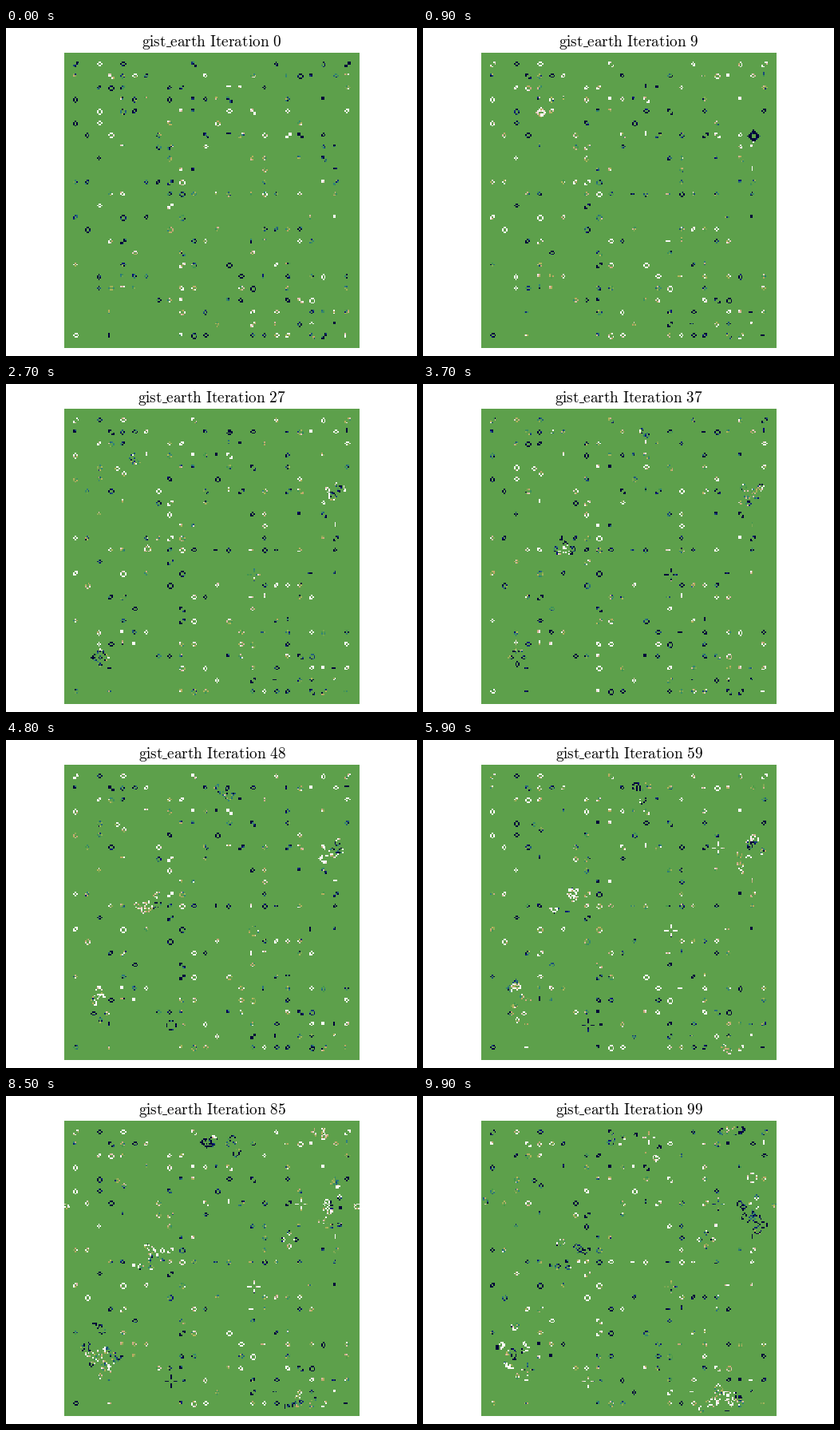
Write a matplotlib script that moves like this. It is 515x411 px and loops after 10000 ms.

```python
import numpy as np
import matplotlib.pyplot as plt
from matplotlib.animation import FuncAnimation
from matplotlib.lines import Line2D

plt.rcParams["mathtext.fontset"] = "cm"

W, H, DPI = 515, 411, 100
LEFT, TOP, SIDE = 73, 31, 370
N, PITCH, STEPS = 200, 8, 100
TURN = 0.382  # colour cycles per generation


def shape(text):
    return np.array([[ch == "#" for ch in row] for row in text.split()])


BLOCK = shape("## ##")
TUB = shape(".#. #.# .#.")
BOAT = shape("##. #.# .#.")
SHIP = shape("##. #.# .##")
HIVE = shape(".##. #..# .##.")
POND = shape(".##. #..# #..# .##.")
BEACON = shape("##.. ##.. ..## ..##")
BLINKER = shape("###")
SETTLED = [BLOCK, TUB, BOAT, SHIP, HIVE, HIVE, POND, BEACON, BLINKER]

LINE = shape("#######")
ROW_OF_BARS = shape("###...###")
LIGHT = np.zeros((9, 9), bool)
LIGHT[4] = ROW_OF_BARS
LIGHT[:, 4] |= ROW_OF_BARS[0]
PENT = shape(".## ##. .#.")
PI = shape("### #.# #.#")

# lattice column, row, generation, pattern
BIRTHS = [
    (23, 7, 4, LINE), (5, 5, 6, LINE), (16, 14, 13, LIGHT),
    (3, 21, 18, LINE), (7, 12, 21, PI), (14, 2, 24, PENT),
    (9, 22, 41, LIGHT), (21, 24, 45, PENT), (20, 7, 57, LIGHT),
    (22, 1, 65, PENT), (19, 10, 65, LINE),
]


def place(grid, x, y, pattern):
    h, w = pattern.shape
    grid[y:y + h, x:x + w] = pattern


def first_world(rng):
    """Scatter settled patterns over about a third of the lattice."""
    grid = np.zeros((N, N), bool)
    for row in range(1, 25):
        for col in range(1, 25):
            if rng.random() < 0.32:
                pattern = SETTLED[rng.integers(len(SETTLED))]
                pattern = np.rot90(pattern, rng.integers(4))
                place(grid, PITCH * col - 2, PITCH * row - 2, pattern)
    return grid


def evolve(grid):
    """One generation of Life on a torus."""
    near = sum(np.roll(grid, (dy, dx), (0, 1)).astype(int)
               for dy in (-1, 0, 1) for dx in (-1, 0, 1)) - grid
    return (near == 3) | (grid & (near == 2))


def give_birth(grid, col, row, pattern):
    h, w = pattern.shape
    x, y = PITCH * col - w // 2, PITCH * row - h // 2
    x, y = min(x, N - w - 2), min(y, N - h - 2)
    grid[y - 2:y + h + 2, x - 2:x + w + 2] = False
    place(grid, x, y, pattern)


def history(rng):
    grid = first_world(rng)
    worlds = []
    for step in range(STEPS):
        if step:
            grid = evolve(grid)
        for col, row, start, pattern in BIRTHS:
            if start == step:
                give_birth(grid, col, row, pattern)
        worlds.append(grid.copy())
    return worlds


def phase_field(rng):
    """One phase per lattice site, with a little spread per cell."""
    sites = rng.uniform(0, 2 * np.pi, (N // PITCH, N // PITCH))
    field = np.kron(sites, np.ones((PITCH, PITCH)))
    field = np.roll(field, (PITCH // 2, PITCH // 2), (0, 1))
    return field + rng.normal(0, 0.4, (N, N))


rng = np.random.default_rng(11)
WORLDS = history(rng)
PHASE = phase_field(rng)


def tinted(step):
    wave = 1.4 * np.cos(2 * np.pi * TURN * step + PHASE)
    return WORLDS[step] * np.clip(wave, -0.98, 1)


fig = plt.figure(figsize=(W / DPI, H / DPI), dpi=DPI, facecolor="white")
ax = fig.add_axes([LEFT / W, 1 - (TOP + SIDE) / H, SIDE / W, SIDE / H])
ax.axis("off")
image = ax.imshow(tinted(0), cmap="gist_earth", vmin=-1, vmax=1,
                  interpolation="nearest", aspect="auto")
title = fig.text(258 / W, 1 - 23 / H, "", size=13.9, ha="center",
                 va="baseline")
dash = Line2D([], [], color="black", lw=0.7, transform=fig.transFigure)
fig.add_artist(dash)


def update(step):
    image.set_data(tinted(step))
    title.set_text(rf"$\mathrm{{gist\,\,earth\ Iteration\ {step}}}$")
    x = 201 if step < 10 else 196
    dash.set_data([x / W, (x + 5) / W], [1 - 23.5 / H] * 2)
    return image, title, dash


anim = FuncAnimation(fig, update, frames=STEPS, interval=100,
                     repeat=True, repeat_delay=0, blit=False)
plt.show()
```
